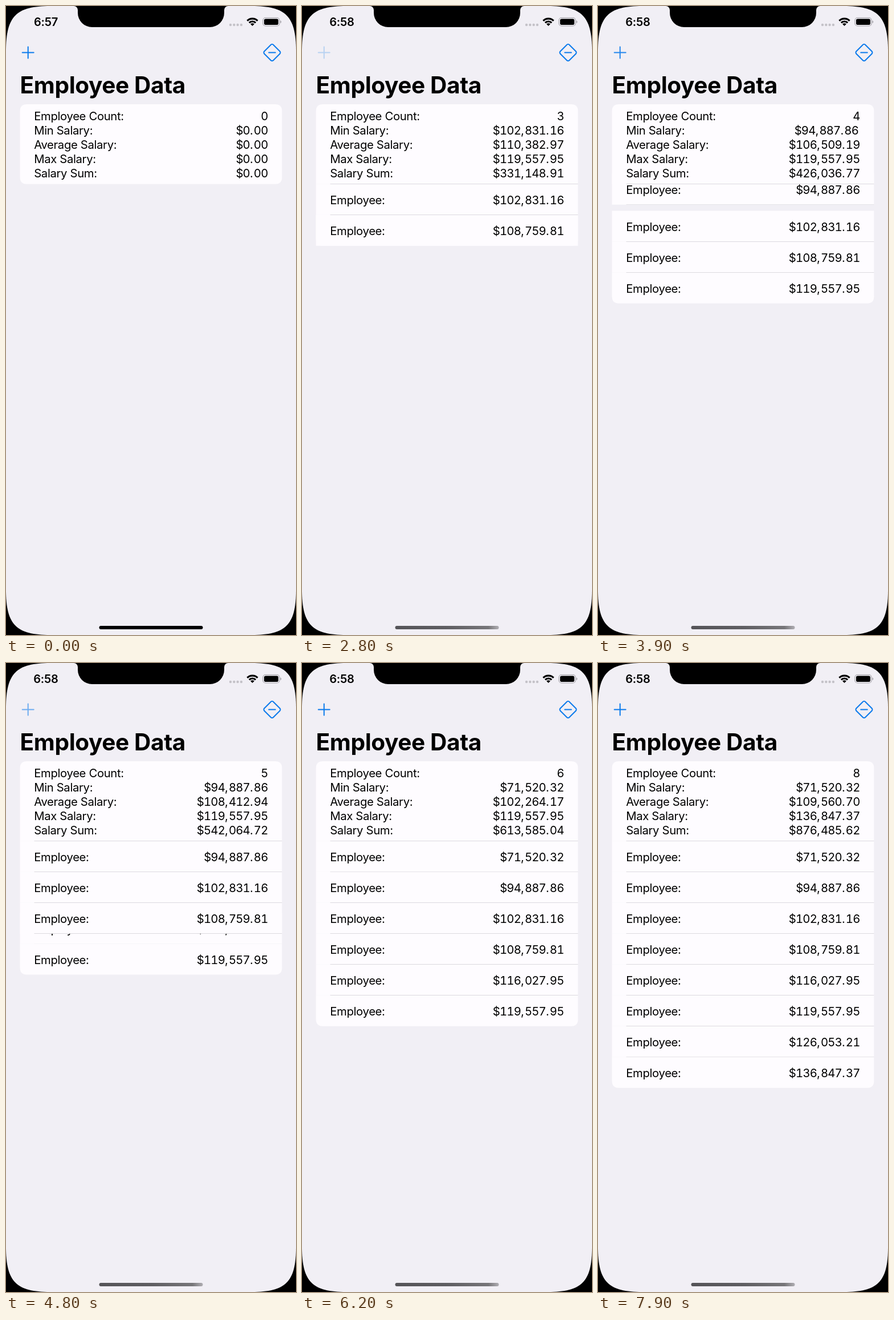
Write an HTML page that moves like this. It is 509 px wide and 1101 px high and loops after 8 s.

```html
<!DOCTYPE html>
<html lang="en">
<head>
<meta charset="utf-8">
<title>Employee Data</title>
<style>
  html, body { margin: 0; height: 100%; overflow: hidden; background: #000; }
  svg { display: block; width: 100%; height: 100%; }
  text { font: 20.3px Inter, "Liberation Sans", sans-serif; font-optical-sizing: none; letter-spacing: -.35px; }
  .num { text-anchor: end; font-variant-numeric: tabular-nums; letter-spacing: -.8px; }
  .num tspan { font-variant-numeric: normal; letter-spacing: 1px; }
  .title { font-size: 40.5px; font-weight: 700; letter-spacing: -.35px; }
  .clock { font-size: 20px; font-weight: 600; text-anchor: middle; letter-spacing: -.2px; }
  .icon { fill: none; stroke: #0a7aec; stroke-width: 2; stroke-linecap: round; }
  .card { fill: #fefcff; }
  .line { fill: #dcdadf; }
</style>
</head>
<body>
<svg viewBox="0 0 509 1101">
  <defs>
    <linearGradient id="dim">
      <stop offset="0" stop-color="#555458"/>
      <stop offset=".5" stop-color="#5f5e62"/>
      <stop offset=".9" stop-color="#777679"/>
      <stop offset="1" stop-color="#b0aeb3"/>
    </linearGradient>
  </defs>
  <path fill="#f1eff5" d="M0 78C0 18 18 0 78 0H431C491 0 509 18 509 78V1023C509 1083 491 1101 431 1101H78C18 1101 0 1083 0 1023Z"/>
  <path d="M119 0a7 7 0 0 1 7 7v5a25 25 0 0 0 25 25H358a25 25 0 0 0 25-25v-5a7 7 0 0 1 7-7Z"/>

  <text id="clock" class="clock" x="70" y="35"></text>
  <path d="M394 33h.01m6.300 0h.01m6.300 0h.01m6.300 0h.01" stroke="#c4c2c8" stroke-width="4.400" stroke-linecap="round"/>
  <path id="wifi" fill="none" stroke="#000" stroke-width="3.100"/>
  <path d="M432.500 35l-3.400-3.400a4.800 4.800 0 0 1 6.800 0Z"/>
  <rect x="451" y="20.500" width="29" height="14.500" rx="4.500" fill="none" stroke="#a4a2a8" stroke-width="1.200"/>
  <rect x="453" y="22.500" width="25" height="10.500" rx="2.800"/>
  <path d="M481.500 25.300q1.800 .8 1.800 2.500t-1.800 2.500Z" fill="#a4a2a8"/>

  <path id="plus" class="icon" d="M28.700 81.500h20M38.700 71.500v20"/>
  <g class="icon" transform="translate(467 81.500)">
    <rect x="-11.200" y="-11.200" width="22.400" height="22.400" rx="3.200" transform="rotate(45)"/>
    <path d="M-5.800 0H5.800"/>
  </g>
  <text class="title" x="24.600" y="153">Employee Data</text>
  <g id="list"></g>
  <rect id="home" x="163.500" y="1085" width="182" height="6" rx="3"/>
</svg>
<script>
const LOOP = 8000, STEP = 100, ROW = 54, TOP = 172, ROWS_TOP = 311.7;
const salaries = [102831.158, 108759.81, 119557.946, 94887.86, 116027.95, 71520.32, 136847.37, 126053.21];
const starts = [500, 1685, 2800, 3700, 4700, 5800, 6700, 7600];
const taps = [1700, 2800, 3700, 4700, 5700, 6700, 7600];

const el = id => document.getElementById(id);
const clamp = x => Math.max(0, Math.min(1, x));
const ease = x => (x = clamp(x), x * x * (3 - 2 * x));
const money = v => '$' + v.toLocaleString('en-US', { minimumFractionDigits: 2, maximumFractionDigits: 2 });

const label = (s, y) => `<text x="49.2" y="${y}">${s}</text>`;
const amount = (s, y, dx = 0) =>
  `<text class="num" x="${459.5 + dx}" y="${y}">${s.replace(/[.,]/g, '<tspan>$&</tspan>')}</text>`;
const line = (y, alpha = 1) =>
  `<rect class="line" x="49.5" y="${Math.floor(y)}" width="435" height="1" opacity="${alpha}"/>`;

// White cell with separate radii for its top and bottom corners
function cell(y, h, top, bottom) {
  const w = 459.8;
  return `<path class="card" d="M24.6 ${y + top}q0 ${-top} ${top} ${-top}h${w - 2 * top}q${top} 0 ${top} ${top}` +
    `v${h - top - bottom}q0 ${bottom} ${-bottom} ${bottom}h${2 * bottom - w}q${-bottom} 0 ${-bottom} ${-bottom}Z"/>`;
}

function stats(list) {
  const n = list.length, sum = list.reduce((a, b) => a + b, 0);
  return [String(n), ...[list[0] || 0, n ? sum / n : 0, list[n - 1] || 0, sum].map(money)];
}

const sorted = n => salaries.slice(0, n).sort((a, b) => a - b);

function header(n, age) {
  const names = ['Employee Count:', 'Min Salary:', 'Average Salary:', 'Max Salary:', 'Salary Sum:'];
  const now = stats(sorted(n)), before = stats(sorted(Math.max(0, n - 1)));
  const rest = 1 - ease(age / 350);
  return cell(TOP, ROWS_TOP - TOP, 12, n ? 0 : 12) + names.map((name, i) => {
    const y = 200 + 25 * i;
    // A value of a new length glides from the centre of the former one
    return label(name, y) + amount(now[i], y, (now[i].length - before[i].length) * 6.3 * rest);
  }).join('') + (n ? line(ROWS_TOP) : '');
}

function rows(n, age) {
  const list = sorted(n), fresh = list.indexOf(salaries[n - 1]);
  const slide = clamp(age / 300), push = ease(age / 260);
  const parts = list.map((pay, i) => {
    const last = i === n - 1;
    const lag = i < fresh ? 0 : 1 - (i === fresh ? slide : push);
    const y = ROWS_TOP + ROW * (i - lag), base = y + 35.3;
    const fades = i === fresh || (i === fresh - 1 && fresh === n - 1);
    // The line sits on the next row's top edge, so the cell ends just above it
    return cell(y, ROW, 0, last ? 12 : 0) + label('Employee:', base) + amount(money(pay), base) +
      (last ? '' : line(y + ROW, fades ? slide : 1));
  });
  // The new row slides out from beneath its neighbours, and upper rows cover lower ones
  const [added] = parts.splice(fresh, 1);
  return added + parts.reverse().join('');
}

function draw(t) {
  const n = starts.filter(s => s <= t).length;
  const age = n > 1 ? t - starts[n - 1] : LOOP;
  const tap = taps.filter(s => s <= t).pop();
  el('clock').textContent = n ? '6:58' : '6:57';
  el('plus').setAttribute('opacity', tap === undefined ? 1 : Math.min(1, .25 + (t - tap) / 310));
  el('home').setAttribute('fill', n > 1 ? 'url(#dim)' : '#000');
  el('list').innerHTML = (n ? rows(n, age) : '') + header(n, age);
}

el('wifi').setAttribute('d', [12.9, 8].map(r => {
  const k = r * Math.SQRT1_2;
  return `M${432.5 - k} ${35 - k}a${r} ${r} 0 0 1 ${2 * k} 0`;
}).join(''));

const begin = performance.now();
let shown = -1;
function tick() {
  const t = Math.floor((performance.now() - begin) % LOOP / STEP) * STEP;
  if (t !== shown) draw(shown = t);
  requestAnimationFrame(tick);
}
tick();
</script>
</body>
</html>
```
